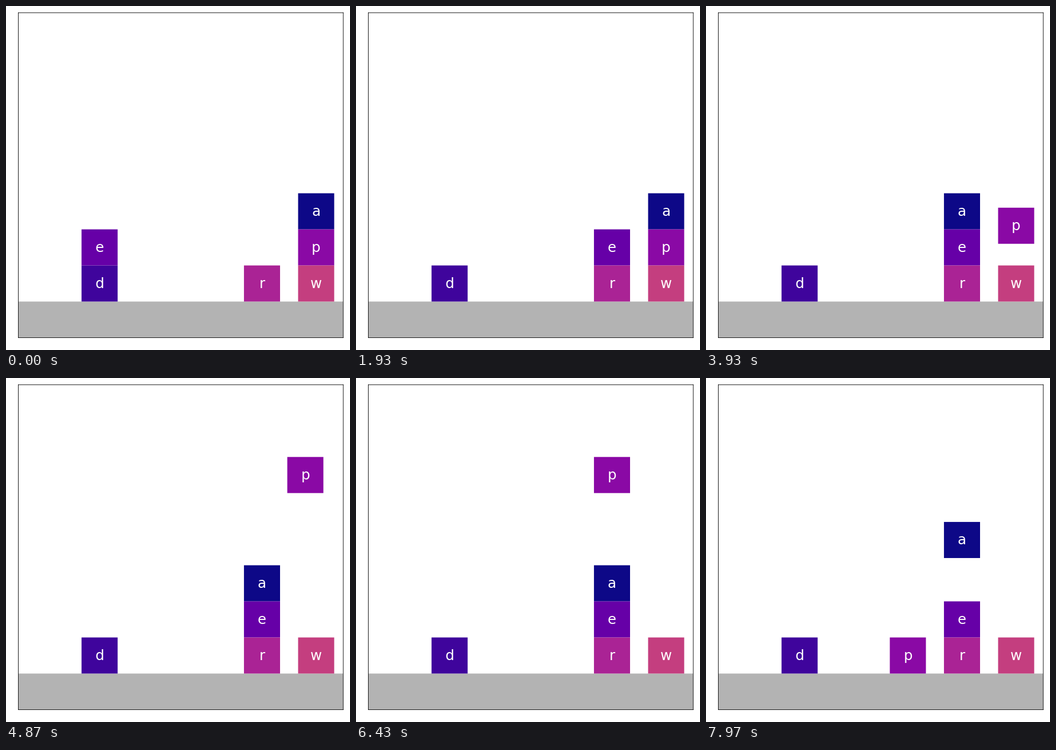
Recreate the animation shown at these times as a matplotlib script. Size 600 by 600 pixels, loop 8000 ms.

```python
import matplotlib.pyplot as plt
from matplotlib.animation import FuncAnimation
from matplotlib.patches import Rectangle

SIZE, DPI = 600, 80
LOOP_MS, TICK_MS = 8000, 20
FPS = 30
UNIT, MARGIN = 62.96, 21.55   # pixels
SIDE = 9 * UNIT / SIZE

CYCLE, PUT_AT = 58, 29        # steps from pick to pick, from pick to put
SLIDE, TRAVEL = 10, 20        # steps sideways, steps up or down
HAND = 5                      # carrying height

COLS = [1.75 + 1.5 * i for i in range(5)]
START = {"a": (COLS[4], 2), "d": (COLS[0], 0), "e": (COLS[0], 1),
         "p": (COLS[4], 1), "r": (COLS[3], 0), "w": (COLS[4], 0)}
MOVES = [("e", COLS[3], 1), ("a", COLS[3], 2), ("p", COLS[3], 3),
         ("p", COLS[2], 0), ("a", COLS[3], 2)]

fig = plt.figure(figsize=(SIZE / DPI, SIZE / DPI), dpi=DPI, facecolor="white")
ax = fig.add_axes([MARGIN / SIZE, MARGIN / SIZE, SIDE, SIDE])
ax.set(xlim=(0, 9), ylim=(-1, 8), xticks=[], yticks=[])
for spine in ax.spines.values():
    spine.set_snap(False)


def box(x, y, w, h, color):
    return ax.add_patch(Rectangle((x, y), w, h, facecolor=color,
                                  edgecolor="none", linewidth=0, snap=False))


def label_pos(x, y):
    return x + 0.5, y + 0.49


box(0, -1, 9, 1, "0.7")
blocks = {}
for i, (name, (x, y)) in enumerate(START.items()):
    rect = box(x, y, 1, 1, plt.cm.plasma(24 * i))
    label = ax.text(*label_pos(x, y), name, color="white", fontsize=22,
                    family="DejaVu Sans", ha="center", va="center")
    blocks[name] = rect, label


def ramp(step, length):
    return min(max(step / length, 0), 1)


def carry(pos, goal, step):
    """Lift, slide and lower; both halves begin with a double step."""
    (x0, y0), (x1, y1) = pos, goal
    if step <= PUT_AT:
        up = ramp(step + 1, TRAVEL)
        return x0, y0 + (HAND - y0) * up
    step += 1 - PUT_AT
    side, down = ramp(step, SLIDE), ramp(step - SLIDE, TRAVEL)
    return x0 + (x1 - x0) * side, HAND + (y1 - HAND) * down


def layout(step):
    pos = dict(START)
    for i, (name, x, y) in enumerate(MOVES):
        local = step - i * CYCLE
        if local > 0:
            pos[name] = carry(pos[name], (x, y), local)
    return pos


def update(tick):
    # step starts fall on rounded hundredths of a second
    ms = (tick + 0.5) * TICK_MS
    step = int((ms + 5) * FPS / 1000)
    for name, (x, y) in layout(step).items():
        rect, label = blocks[name]
        rect.set_xy((x, y))
        label.set_position(label_pos(x, y))
    return [artist for pair in blocks.values() for artist in pair]


anim = FuncAnimation(fig, update, frames=LOOP_MS // TICK_MS, interval=TICK_MS,
                     repeat=True, repeat_delay=0, blit=False)
plt.show()
```
